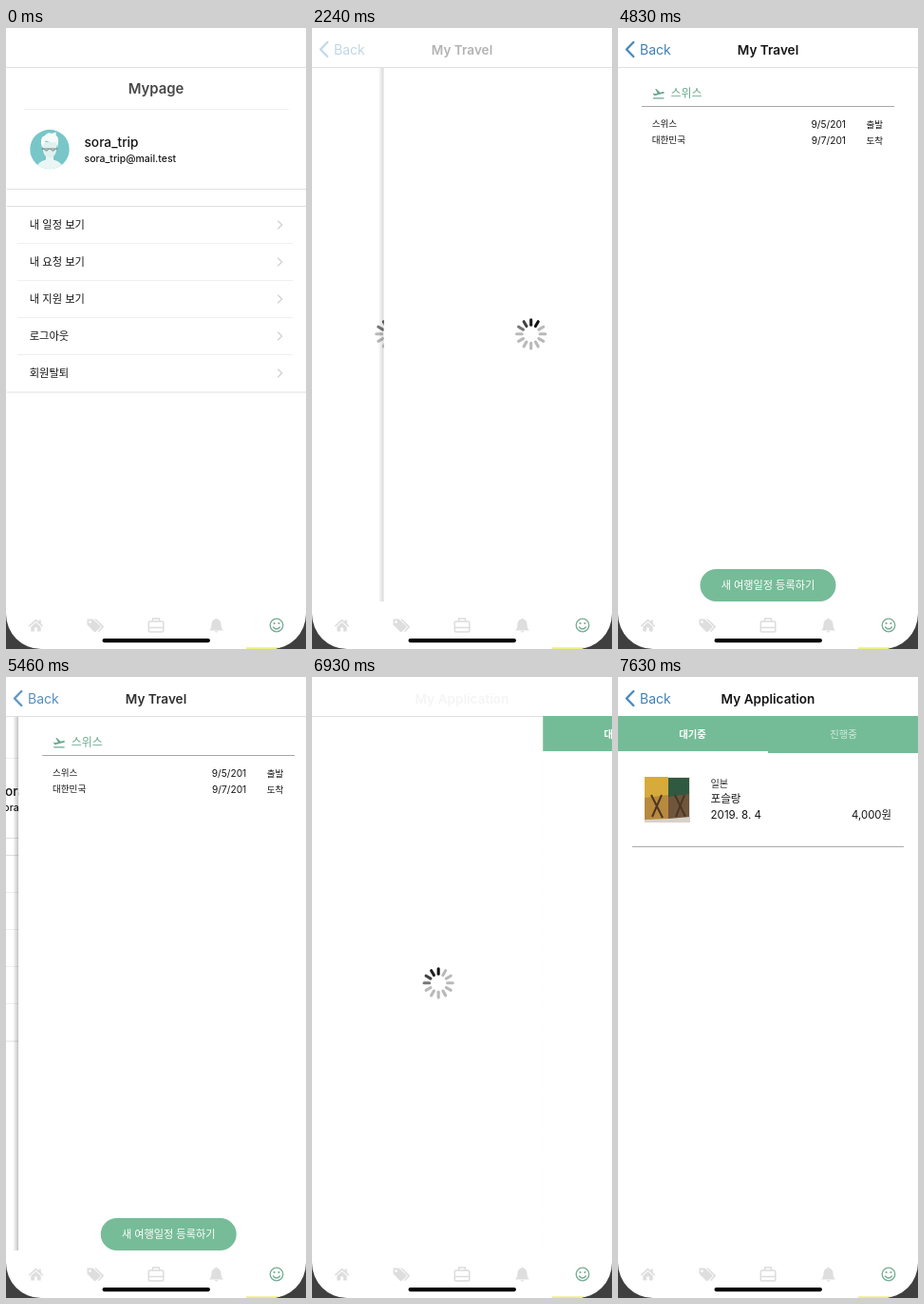
An HTML page for the animation above (8 s loop, 316 px wide and 653 px high).

```html
<!DOCTYPE html>
<html lang="ko">
<head>
<meta charset="utf-8">
<title>Mypage</title>
<style>
  html, body { margin: 0; width: 100%; height: 100%; overflow: hidden; background: #fff; }
  svg { display: block; width: 316px; height: 653px; }
  text { font-family: Inter, "Noto Sans CJK KR", "Noto Sans CJK", "Noto Sans CJK JP", sans-serif; fill: #151515; }
  .mid { text-anchor: middle; }
  .end { text-anchor: end; }
  .semi { font-weight: 600; }
  .rule { stroke: #efefef; }
  .edge { stroke: #e0e0e0; }
  .line { fill: none; stroke-linecap: round; stroke-linejoin: round; }
</style>
</head>
<body>
<svg viewBox="0 0 316 653">
  <defs>
    <clipPath id="body"><rect y="41" width="316" height="562"/></clipPath>
    <clipPath id="face"><circle cx="46" cy="127.5" r="20.7"/></clipPath>
    <linearGradient id="shade">
      <stop offset="0" stop-color="#000" stop-opacity="0"/>
      <stop offset="1" stop-color="#000" stop-opacity=".24"/>
    </linearGradient>
    <g id="spin"></g>
  </defs>
  <rect width="316" height="653" fill="#fff"/>
  <path class="edge" d="M0 41.500H316"/>

  <g clip-path="url(#body)">
    <g id="home">
      <g id="menu">
        <text class="mid semi" x="158" y="69.300" font-size="14.900" style="fill:#484848">Mypage</text>
        <path class="rule" d="M19 85.500H298"/>
        <g clip-path="url(#face)">
          <rect x="25" y="106" width="42" height="43" fill="#78c6c8"/>
          <path d="M31 150Q32 141 42 138.500V132H50V138.500Q60 141 61 150Z" fill="#eaf6f5"/>
          <path d="M39 120H53V129Q52 136 46 136.500Q40 136 39 129Z" fill="#dff0ee"/>
          <path d="M38 126Q34.500 115 41 113Q44 109 48 111L53 109.500L52.500 112.500Q57 116 54 126L52.500 120Q46 121 42 118.500Z" fill="#f6fbfa"/>
          <path class="line" d="M38 127H54M40 127.500Q42.500 131 45 127.500M47 127.500Q49.500 131 52 127.500" stroke="#6f7f80"/>
        </g>
        <g font-weight="500">
          <text x="82.500" y="125" font-size="13.700">sora_trip</text>
          <text x="82.500" y="141" font-size="10.500">sora_trip@mail.test</text>
        </g>
        <path class="edge" d="M1 169.500H316M1 187.500H316M1 383H316"/>
        <g id="rows"></g>
      </g>
      <use id="homeSpin" href="#spin"/>
    </g>

    <g id="travel">
      <rect class="shade" x="-6" y="42" width="6" height="561" fill="url(#shade)"/>
      <rect y="42" width="316" height="561" fill="#fff"/>
      <use id="tripSpin" href="#spin"/>
      <g id="trip">
        <path transform="translate(35.5 61.800) scale(.6)" fill="#6aa88d" d="M2.500 19h19v2h-19zm19.570-9.360c-.21-.8-1.040-1.280-1.840-1.060L14.920 10l-6.900-6.430-1.930.51 4.140 7.170-4.970 1.330-1.970-1.540-1.450.39 1.820 3.160.77 1.330 1.600-.43 5.310-1.420 4.350-1.160L21 11.490c.81-.23 1.280-1.050 1.070-1.850z"/>
        <text x="55.500" y="73.300" font-size="12" style="fill:#6aa88d">스위스</text>
        <path d="M25 82.500H291" stroke="#a6a6a6"/>
        <g font-size="9.600">
          <text x="35.700" y="104.300">스위스</text>
          <text x="35.700" y="121.200">대한민국</text>
          <text x="261.500" y="104.500">출발</text>
          <text x="261.500" y="121.500">도착</text>
        </g>
        <g font-size="10.200" class="end">
          <text x="240" y="105.200">9/5/201</text>
          <text x="240" y="122.200">9/7/201</text>
        </g>
        <rect x="86.500" y="569" width="143" height="34" rx="17" fill="#76bc98"/>
        <text class="mid" x="158" y="590" font-size="11.200" font-weight="500" style="fill:#fff">새 여행일정 등록하기</text>
      </g>
    </g>

    <g id="apply">
      <rect class="shade" x="-6" y="42" width="6" height="561" fill="url(#shade)"/>
      <rect y="42" width="316" height="561" fill="#fff"/>
      <path d="M0 41H316V80H158V78H0Z" fill="#74bc97"/>
      <g font-size="10.400" class="mid">
        <text x="78.500" y="64.300" font-weight="700" style="fill:#fff">대기중</text>
        <text x="237.500" y="64.300" style="fill:#d3ebdf">진행중</text>
      </g>
      <g id="order">
        <g id="photo">
          <rect x="28" y="105" width="48" height="48" fill="#e9e5df"/>
          <path d="M28 105H53V150H28Z" fill="#d6ab3c"/>
          <path d="M28 127L53 124V150H28Z" fill="#b78a3d"/>
          <path d="M53 106H75V148L53 151Z" fill="#2f5a41"/>
          <path d="M53 126L75 123V148L53 151Z" fill="#70553d"/>
          <path d="M35 124L47 148M46 124L36 147M60 124L71 147M70 124L61 147" stroke="#4c3523" stroke-width="2"/>
          <path d="M28 150L53 149 76 147V153H28Z" fill="#d8d2ca"/>
        </g>
        <text x="97.500" y="115.600" font-size="10.200" style="fill:#333">일본</text>
        <text x="97.500" y="131.500" font-size="11.600" font-weight="500">포슬랑</text>
        <text x="97.500" y="149" font-size="11.600">2019. 8. 4</text>
        <text class="end" x="288" y="149" font-size="11.400">4,000원</text>
        <path d="M15 178.500H301" stroke="#ababab"/>
      </g>
    </g>
  </g>

  <g id="back">
    <path class="line" d="M16.300 15L9 22.500L16.300 30" stroke="#4a8abd" stroke-width="2.400"/>
    <text x="23" y="27.600" font-size="14" style="fill:#3f80b5">Back</text>
  </g>
  <g class="mid semi" font-size="13.600">
    <text id="tripTitle" x="158" y="27.500">My Travel</text>
    <text id="applyTitle" x="158" y="27.500">My Application</text>
  </g>

  <g fill="#dedede">
    <path d="M23.800 628.500L31.500 621.500L34.500 624.200V622.500H36.800V626.300L39.200 628.500L38.200 629.700L31.500 623.700L24.800 629.700Z"/>
    <path d="M26.300 629.700L31.500 625L36.700 629.700V634.500H33V630.500H30V634.500H26.300Z"/>
    <path fill-rule="evenodd" d="M85.500 621.500H91.500L99.500 629Q100 629.700 99.500 630.300L94.500 635Q93.800 635.500 93 635L85.500 627.500ZM88.500 623.200a1.300 1.300 0 1 0 .01 0Z"/>
    <path d="M93 621.500H95L102.600 628.700Q103.300 629.600 102.600 630.400L97.800 635.200L96.800 634.200L101 629.800Z"/>
    <path d="M214 633.500Q216.500 631.500 216.500 626.500Q217 622.500 220.500 621.500Q221.500 619.500 222.500 621.500Q226 622.500 226.500 626.500Q226.500 631.500 229 633.500ZM219.500 634.300H223.500Q221.500 637 219.500 634.300Z"/>
  </g>
  <path class="line" d="M151.500 624H164.500Q165.800 624 165.800 625.300V634Q165.800 635 164.500 635H151.500Q150.300 635 150.300 634V625.300Q150.300 624 151.500 624ZM154.500 624V621H161.500V624M150.300 630.500H165.800" stroke="#dcdcdc" stroke-width="1.500"/>
  <g class="line" stroke="#76ac95" stroke-width="1.300">
    <circle cx="285" cy="628" r="6.800"/>
    <path d="M281.500 630Q285 634 288.500 630"/>
  </g>
  <g fill="#76ac95"><circle cx="282.600" cy="626" r="1.100"/><circle cx="287.400" cy="626" r="1.100"/></g>

  <path d="M0 616A37 37 0 0 0 37 653H0ZM316 616A37 37 0 0 1 279 653H316Z" fill="#3f3f3f"/>
  <path d="M253 653V651.300H288L284 653Z" fill="#ecf07c"/>
  <rect x="101.500" y="642" width="113.500" height="4.200" rx="2.100" fill="#000"/>
</svg>

<script>
const LOOP = 8000, TICK = 70, WIDTH = 316, SLIDE = 500;
const PUSH_TRIP = 2106, POP_TRIP = 5454, PUSH_APPLY = 6896.5;
const el = id => document.getElementById(id);
const NS = "http://www.w3.org/2000/svg";

function add(parent, tag, attrs, text) {
  const node = document.createElementNS(NS, tag);
  for (const key in attrs) node.setAttribute(key, attrs[key]);
  if (text) node.textContent = text;
  parent.append(node);
  return node;
}

["내 일정 보기", "내 요청 보기", "내 지원 보기", "로그아웃", "회원탈퇴"].forEach((label, i) => {
  const y = 207 + i * 39;
  add(el("rows"), "text", { x: 24.7, y: y + 4.2, "font-size": 11.3 }, label);
  add(el("rows"), "path", { class: "line", d: `M286.500 ${y - 4}l4.200 4l-4.200 4`, stroke: "#cfcfcf", "stroke-width": 1.1 });
  if (i < 4) add(el("rows"), "path", { class: "rule", d: `M12 ${y + 19.5}H302` });
});

const spokes = Array.from({ length: 12 }, (_, i) => add(el("spin"), "path", {
  d: "M155 306.700V312.300", class: "line", "stroke-width": 3.1, transform: `rotate(${i * 30} 155 321.800)`
}));

const curve = (s, a, b) => 3 * (1 - s) ** 2 * s * a + 3 * (1 - s) * s * s * b + s ** 3;

function ease(x) {
  if (x <= 0) return 0;
  if (x >= 1) return 1;
  let lo = 0, hi = 1;
  for (let i = 0; i < 24; i++) {
    const mid = (lo + hi) / 2;
    if (curve(mid, 0.2833, 0.31833) < x) lo = mid; else hi = mid;
  }
  return curve(lo, 0.99, 0.99);
}

const slide = (t, start) => ease((t - start) / SLIDE);
// Bar labels appear mostly in the last part of a slide.
const fade = p => p < 0.76 ? 0.32 * (p / 0.76) ** 1.8 : 0.32 + 0.68 * (p - 0.76) / 0.24;
const show = (id, on) => el(id).style.display = on ? "" : "none";

function place(id, p) {
  show(id, p > 0);
  el(id).setAttribute("transform", `translate(${(1 - p) * WIDTH} 0)`);
  el(id).querySelector(".shade").style.opacity = p < 1 ? p ** 3 * 1.5 : 0;
}

function turn(t) {
  const late = t > 4000;
  const head = Math.floor((t - (late ? 6930 : 2240)) / 83.3 + 0.01) + (late ? 0 : 1);
  spokes.forEach((spoke, i) => {
    const lag = (((head - i) % 12) + 12) % 12;
    const level = Math.min(185, 20 + lag * lag * 11);
    spoke.setAttribute("stroke", `rgb(${level},${level},${level})`);
  });
}

function draw(t) {
  const trip = slide(t, PUSH_TRIP) * (1 - slide(t, POP_TRIP));
  const apply = slide(t, PUSH_APPLY);
  const busy = (t >= 1960 && t < 5110) || t >= 6860;

  el("home").setAttribute("transform", `translate(${-0.3 * WIDTH * Math.max(trip, apply)} 0)`);
  show("menu", !busy);
  show("homeSpin", busy);
  place("travel", trip);
  place("apply", apply);
  show("trip", t >= 2800);
  show("tripSpin", t < 2800);
  show("order", t >= 7350);
  show("photo", t >= 7420);

  el("tripTitle").style.opacity = fade(trip);
  el("applyTitle").style.opacity = fade(apply);
  const p = Math.max(trip, apply);
  el("back").style.opacity = p < 0.4 ? 0 : fade(p) * Math.min(1, (p - 0.4) / 0.3);
  turn(t);
}

const begin = performance.now();
function frame(now) {
  const t = Math.max(0, now - begin) % LOOP;
  draw(Math.floor(t / TICK) * TICK);
  requestAnimationFrame(frame);
}
draw(0);
requestAnimationFrame(frame);
</script>
</body>
</html>
```
